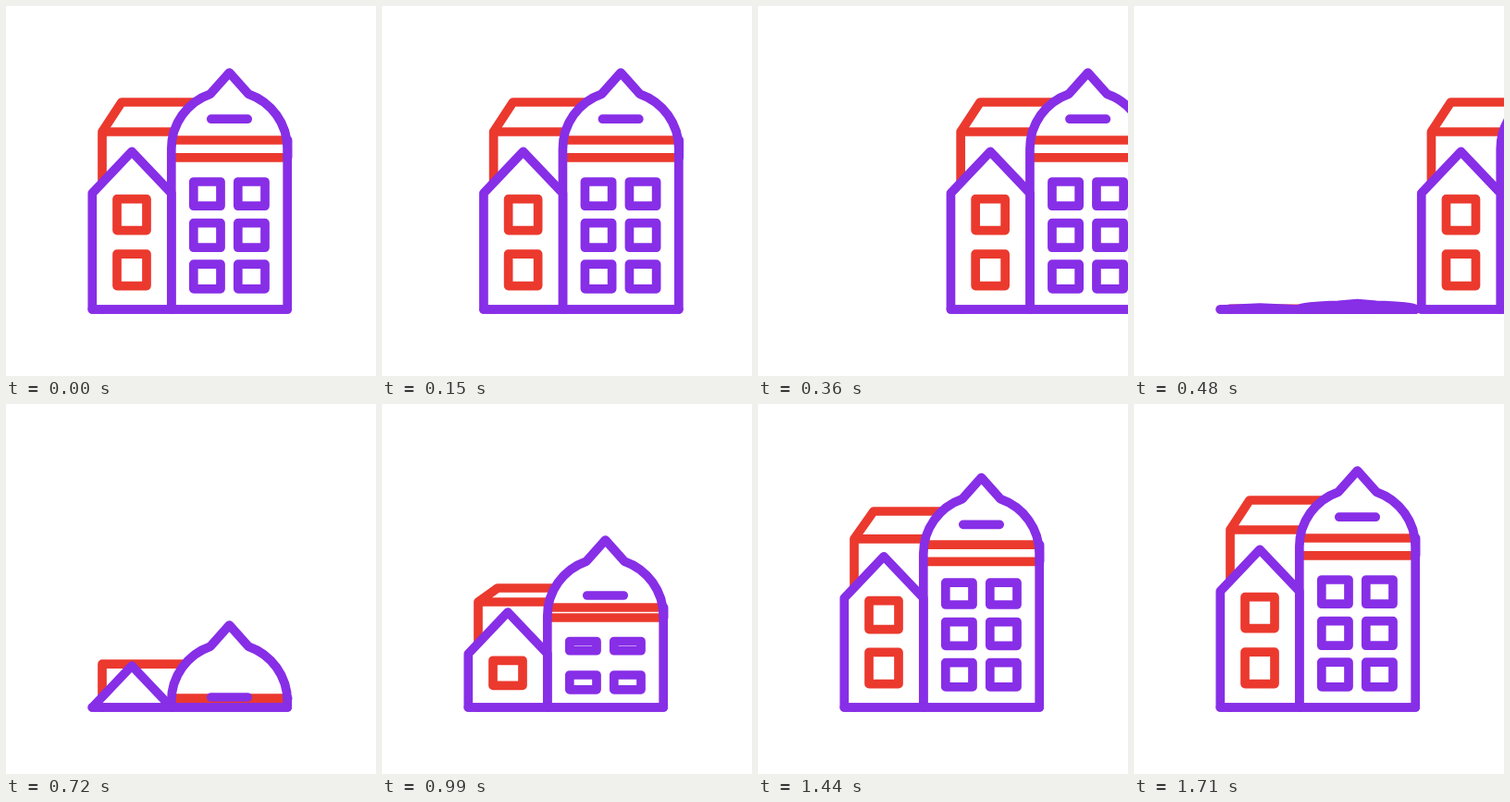
Recreate the animation shown at these times as an HTML page. Size 400 by 400 pixels, loop 3.74 s.

```html
<!DOCTYPE html>
<html lang="en">
<head>
<meta charset="utf-8">
<title>Town houses</title>
<style>
  html, body { margin: 0; width: 100%; height: 100%; overflow: hidden; background: #fff; }
  svg { display: block; width: 100vw; height: 100vh; }
  path { stroke-width: 9.7; stroke-linecap: round; stroke-linejoin: round; }
</style>
</head>
<body>
<svg id="stage" viewBox="0 0 400 400"></svg>
<script>
const LOOP = 3740, STEP = 30, GROW_START = 390, GROW_END = 1710;
const PURPLE = '#872ee7', RED = '#eb392e', GROUND = 328;
const stage = document.getElementById('stage');

// Smooth monotone curve through [time, value] points, at rest at the end.
function track(points) {
  const secant = points.slice(1).map(([t, v], i) => (v - points[i][1]) / (t - points[i][0]));
  const slope = points.map((_, i) => {
    const a = secant[i - 1], b = secant[i];
    return a * b > 0 ? 2 * a * b / (a + b) : 0;
  });
  return time => {
    if (time <= points[0][0]) return points[0][1];
    const i = points.findIndex(p => p[0] >= time) - 1;
    if (i < 0) return points.at(-1)[1];
    const [t0, v0] = points[i], [t1, v1] = points[i + 1];
    const d = t1 - t0, u = (time - t0) / d, w = 1 - u;
    return v0 * w * w * (1 + 2 * u) + v1 * u * u * (3 - 2 * u)
      + d * u * w * (slope[i] * w - slope[i + 1] * u);
  };
}

// Adds the shared slow settling at the end of the growth.
function settle(points, end) {
  const last = points.at(-1)[1];
  return track([...points, [1410, end + (last - end) * .33], [GROW_END, end]]);
}

const rise = (a, b, c, d, end) =>
  settle([[GROW_START, GROUND], [480, a], [720, b], [990, c], [1230, d]], end);

const heights = {
  towerPeak: rise(321.5, 239, 147, 99, 72),
  housePeak: rise(326, 283, 225, 184, 157.3),
  boxTop: rise(327.3, 281, 199, 147, 104),
  boxEdge: rise(327.4, 281.2, 214, 171, 136),
  upperStripe: rise(327.8, 318, 220, 170.5, 145),
  lowerStripe: rise(327.9, 318.8, 231, 187, 163.8),
  dash: rise(327.8, 317, 207, 151.3, 122.2)
};

function makeWindow(color, columns, width, start, from, keys, top, bottom) {
  const edge = (side, end) => settle([[start, from], ...keys.map(k => [k[0], k[side]])], end);
  return { color, columns, width, start, top: edge(1, top), bottom: edge(2, bottom) };
}

const tower = [202.8, 250.8], house = [120];
const windows = [
  makeWindow(PURPLE, tower, 29.2, 1050, 221, [[1230, 201.4, 219]], 190, 216.2),
  makeWindow(PURPLE, tower, 29.2, 875, 272, [[990, 256.5, 266.7], [1230, 237.7, 261.6]], 234.7, 261.2),
  makeWindow(PURPLE, tower, 29.2, 740, 315, [[990, 293, 308.8], [1230, 281, 306.3]], 279.2, 305.8),
  makeWindow(RED, house, 32, 1060, 250, [[1230, 222.8, 246]], 208.7, 242.6),
  makeWindow(RED, house, 32, 790, 312, [[990, 277.3, 304.4], [1230, 268.8, 302.8]], 268.2, 302.6)
];

const draw = (d, stroke, fill = 'none', extra = '') =>
  `<path d="${d}" stroke="${stroke}" fill="${fill}" ${extra}/>`;

function drawWindows(color, time) {
  return windows.filter(w => w.color === color && time >= w.start).map(w =>
    w.columns.map(x => draw(
      `M${x} ${w.top(time)}h${w.width}V${w.bottom(time)}h${-w.width}Z`, color)).join('')
  ).join('');
}

function building(time) {
  const y = {};
  for (const name in heights) y[name] = heights[name](time);

  // Roofs unfold to full height first, then the walls lift them.
  const dome = Math.min(1, (GROUND - y.towerPeak) / 82.3);
  const spring = y.towerPeak + 82.3 * dome;
  const shoulder = spring - 59.25 * dome;
  const arc = `A62.7 ${62.7 * dome} 0 0 1 `;
  const towerPath = `M178.8 ${GROUND}V${spring}${arc}221 ${shoulder}`
    + `L241.5 ${y.towerPeak}L262 ${shoulder}${arc}304.2 ${spring}V${GROUND}Z`;
  const eaves = Math.min(GROUND, y.housePeak + 45);
  const stripe = h => draw(`M182 ${h}H301`, RED, 'none', 'style="stroke-linecap:butt"');

  return draw(`M104 ${GROUND}V${y.boxEdge}L125 ${y.boxTop}H215M104 ${y.boxEdge}H185`, RED)
    + draw(towerPath, 'none', '#fff')
    + drawWindows(PURPLE, time)
    + stripe(y.upperStripe) + stripe(y.lowerStripe)
    + draw(towerPath, PURPLE)
    + draw(`M304.6 ${y.upperStripe}V${y.lowerStripe}M221.8 ${y.dash}H261.2`, PURPLE)
    + draw(`M93.3 ${GROUND}V${eaves}L136 ${y.housePeak}L178.8 ${eaves}V${GROUND}Z`, PURPLE, '#fff')
    + drawWindows(RED, time)
    + draw(`M93.3 ${GROUND}H304.2`, PURPLE);
}

function render(now) {
  const time = Math.floor(now % LOOP / STEP) * STEP;
  const slide = 47 * (time / 240) ** 2.21;
  let scene = time >= GROW_START ? building(time) : '';
  if (slide < 320) scene += `<g transform="translate(${slide})">${building(GROW_END)}</g>`;
  stage.innerHTML = scene;
}

const begin = performance.now();
function tick() {
  render(performance.now() - begin);
  requestAnimationFrame(tick);
}
tick();
</script>
</body>
</html>
```
